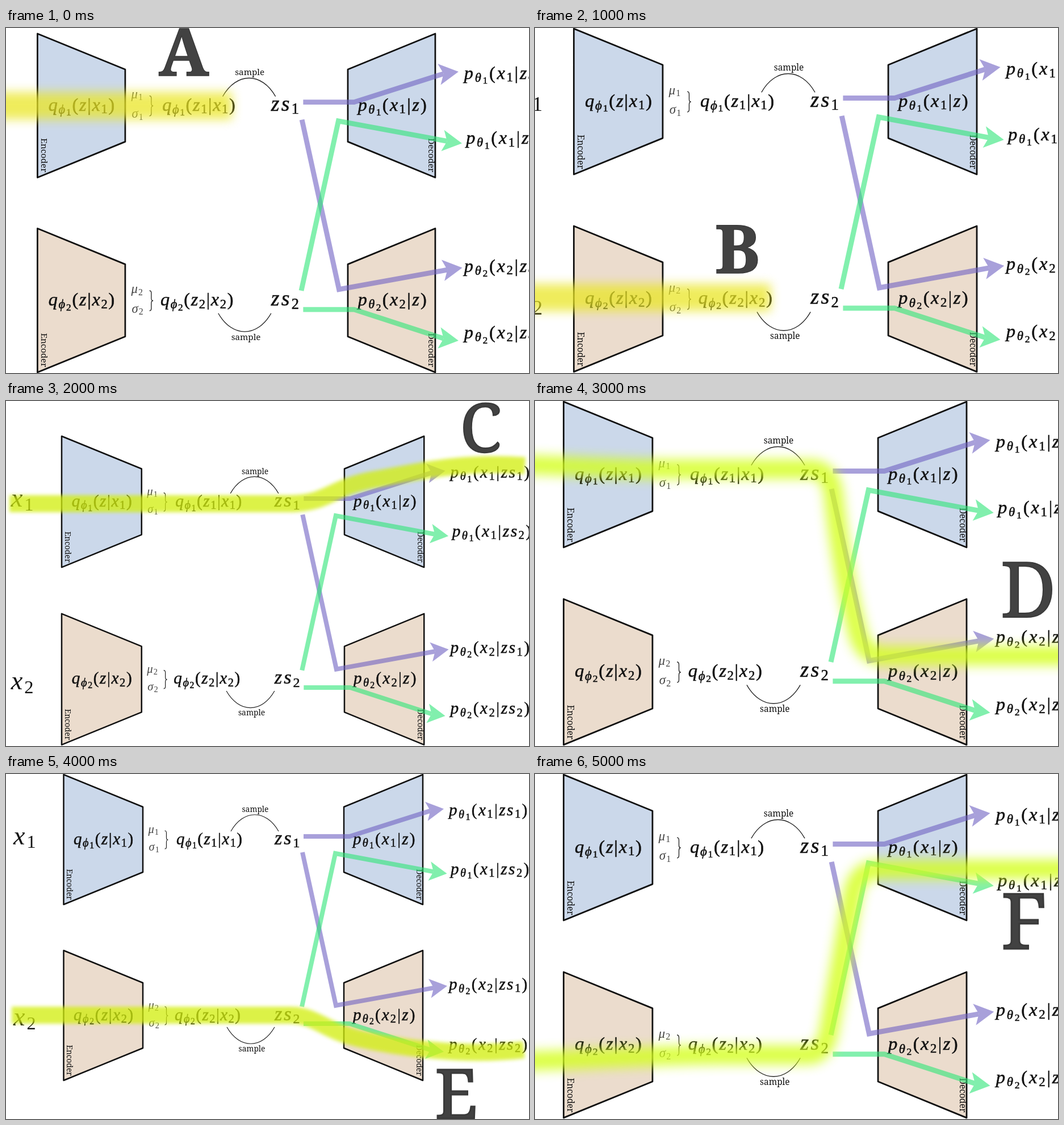
These frames come from a looping animation (921 px wide and 608 px high, 6000 ms). An HTML page:

```html
<!DOCTYPE html>
<html lang="en">
<head>
<meta charset="utf-8">
<title>Two encoders, two decoders</title>
<style>
  html, body { margin: 0; width: 100%; height: 100%; overflow: hidden; background: #fff; }
  svg { display: block; width: 100vw; height: 100vh; }
  text { white-space: pre; }
  .math { font-family: "Liberation Serif", serif; fill: #111; }
  .strong { stroke: #111; stroke-width: .5; }
  .label { font: 13.7px "Noto Serif", serif; fill: #111; }
  .box { stroke: #111; stroke-width: 2.5; stroke-linejoin: round; }
  .thin { fill: none; stroke: #222; stroke-width: 1.2; }
  .arrow { opacity: .6; }
  .arrow polyline { fill: none; stroke: currentColor; stroke-width: 8; }
  .arrow path { fill: currentColor; }
  #marker { fill: none; stroke-linejoin: round; }
  #letter { font-family: "Noto Serif", serif; text-anchor: middle; fill: #424242; stroke: #3a3a3a; }
</style>
</head>
<body>
<svg viewBox="0 0 921 608" preserveAspectRatio="none">
  <g id="diagram"></g>
  <path id="marker"/>
  <text id="letter"/>
</svg>
<script>
const SCENE_MS = 1000;
const PURPLE = "rgb(112,98,195)", GREEN = "rgb(47,230,120)";
const byId = id => document.getElementById(id);

// Typesets a formula: digits are subscripts, θ and ϕ are subscripts with their own subscript.
function math(x, y, source, { size = 29, spacing = 1.6, cls = "strong", color = "" } = {}) {
  let level = 0, previous = "";
  const spans = [...source].map(char => {
    const greekSub = /[θϕ]/.test(char), digit = /\d/.test(char);
    const nested = digit && /[θϕ]/.test(previous);
    const drop = nested ? .27 : greekSub ? .16 : digit ? .15 : 0;
    const scale = nested ? .54 : greekSub || digit ? .7 : 1;
    const style = /[a-zθϕμσ]/.test(char) ? "italic" : "normal";
    const dy = (drop - level) * size;
    level = drop;
    previous = char;
    return `<tspan dy="${dy.toFixed(2)}" font-size="${(size * scale).toFixed(2)}" font-style="${style}">${char}</tspan>`;
  }).join("");
  return `<text class="math ${cls}" x="${x}" y="${y}" letter-spacing="${spacing}" style="${color && "fill:" + color}">${spans}</text>`;
}

const label = (x, y, text, attributes = "") => `<text class="label" x="${x}" y="${y}" ${attributes}>${text}</text>`;
const sideLabel = (x, y, text) => label(0, 0, text, `transform="translate(${x} ${y}) rotate(90)"`);

function arrow(color, points, tip, angle) {
  const back = angle * Math.PI / 180;
  const neck = [tip[0] - 24 * Math.cos(back), tip[1] - 24 * Math.sin(back)];
  return `<g class="arrow" style="color:${color}">
    <polyline points="${[...points, neck].join(" ")}"/>
    <path transform="translate(${tip}) rotate(${angle})" d="M0 0L-31 -17L-24 0L-31 17Z"/></g>`;
}

// One encoder-decoder row; n is its index in the formulas.
function row(n, top, fill) {
  const small = { size: 20.5, spacing: 1, cls: "", color: "#444" };
  const y = top + 123.5;
  const sample = n === 1
    ? `<path class="thin" d="M396 101C418 62 458 62 480 101"/>` + label(439, 67, "sample", 'text-anchor="middle"')
    : `<path class="thin" d="M389 446C411 485 451 485 473 446"/>` + label(433, 488.5, "sample", 'text-anchor="middle"');
  return `
    <g class="box" fill="${fill}" transform="translate(0 ${top})">
      <path d="M101.5 1V230L241 173V58Z"/><path d="M734 1V230L595 173V58Z"/>
    </g>
    <path class="thin" transform="translate(279.5 ${top + 100})" d="M0 0Q3 0 3 4V12Q3 16 6 16Q3 16 3 20V28Q3 32 0 32"/>
    ${math(13, n === 1 ? 123.5 : 443, "x" + n, { size: 46, spacing: 3, cls: "" })}
    ${math(119, y, `qϕ${n}(z|x${n})`)}
    ${math(250.5, top + 104, "μ" + n, small)}
    ${math(251.5, top + 135, "σ" + n, small)}
    ${math(n === 1 ? 300 : 297, y, `qϕ${n}(z${n}|x${n})`, { spacing: 1.5 })}
    ${math(473, y, "zs" + n, { size: 34, spacing: 3 })}
    ${math(611, y, `pθ${n}(x${n}|z)`, { spacing: 2.2 })}
    ${math(780, n === 1 ? 73 : 380, `pθ${n}(x${n}|zs1)`, { spacing: 2.5 })}
    ${math(n === 1 ? 783 : 780, n === 1 ? 176.5 : 486, `pθ${n}(x${n}|zs2)`, { spacing: 2.5 })}
    ${sideLabel(107, top + 167.5, "Encoder")}
    ${sideLabel(723, top + 167.5, "Decoder")}
    ${sample}`;
}

byId("diagram").innerHTML =
  row(1, 0, "#cbd8ea") + row(2, 310, "#ebdccd") +
  arrow(PURPLE, [[524, 110], [605, 110]], [771, 61.5], -8) +
  arrow(PURPLE, [[522, 138], [581, 408]], [777, 373.5], -8) +
  arrow(GREEN, [[521, 410], [580, 140]], [776.5, 175.5], 8) +
  arrow(GREEN, [[524, 440], [605, 440]], [771, 489.5], 8);

// Marker pens: colour, line width, blur radius, opacity.
const YELLOW = ["rgb(234,230,36)", 48, 9, .74];
const OLIVE = ["rgb(210,238,14)", 30, 3, .76];
const LIME = ["rgb(212,255,28)", 34, 10, .82];

// view: scale, x, y; letter: text, centre x, baseline, size, weight, outline
const scenes = [
  { view: [1.1075, -57, 8.8], pen: YELLOW, path: "M-60 137H398", letter: ["A", 313, 84, 117, 700, 1.5] },
  { view: [1.122, -45.5, 0], pen: YELLOW, path: "M-60 475H415", letter: ["B", 356.5, 432, 118, 700, 1.5] },
  { view: [1.009, -4.4, 61], pen: OLIVE, path: "M6 181H500C570 180 570 152 650 138S800 106 914 114", letter: ["C", 836, 90, 119, 400, 2.5] },
  { view: [1.122, -63.5, 0], pen: LIME, path: "M-60 112C40 112 120 120 240 120H485Q518 120 525 160Q540 300 566 400Q577 449 610 449H990", letter: ["D", 868.5, 381, 135, 400, 2] },
  { view: [1, 0, 0], pen: OLIVE, path: "M10 425H500C545 425 560 452 620 466S800 499 912 486", letter: ["E", 793, 607, 120, 400, 3] },
  { view: [1.122, -63.5, 0], pen: LIME, path: "M-60 507C100 504 200 495 330 495H480Q511 495 518 450L559 215Q567 168 605 168H990", letter: ["F", 861, 308, 136, 400, 3] }
];

function setAttributes(element, attributes) {
  for (const [name, value] of Object.entries(attributes)) element.setAttribute(name, value);
}

function show({ view: [scale, dx, dy], pen, path, letter }) {
  byId("diagram").setAttribute("transform", `translate(${dx} ${dy}) scale(${scale})`);
  const [stroke, width, blur, opacity] = pen;
  setAttributes(byId("marker"), {
    d: path, stroke, "stroke-width": width, opacity, style: `filter:blur(${blur}px)`
  });
  const [text, x, y, size, weight, outline] = letter;
  byId("letter").textContent = text;
  setAttributes(byId("letter"), {
    x, y, "font-size": size, "font-weight": weight, "stroke-width": outline
  });
}

let current = -1;
function tick() {
  const index = Math.floor(performance.now() / SCENE_MS) % scenes.length;
  if (index !== current) show(scenes[current = index]);
  requestAnimationFrame(tick);
}
tick();
</script>
</body>
</html>
```
